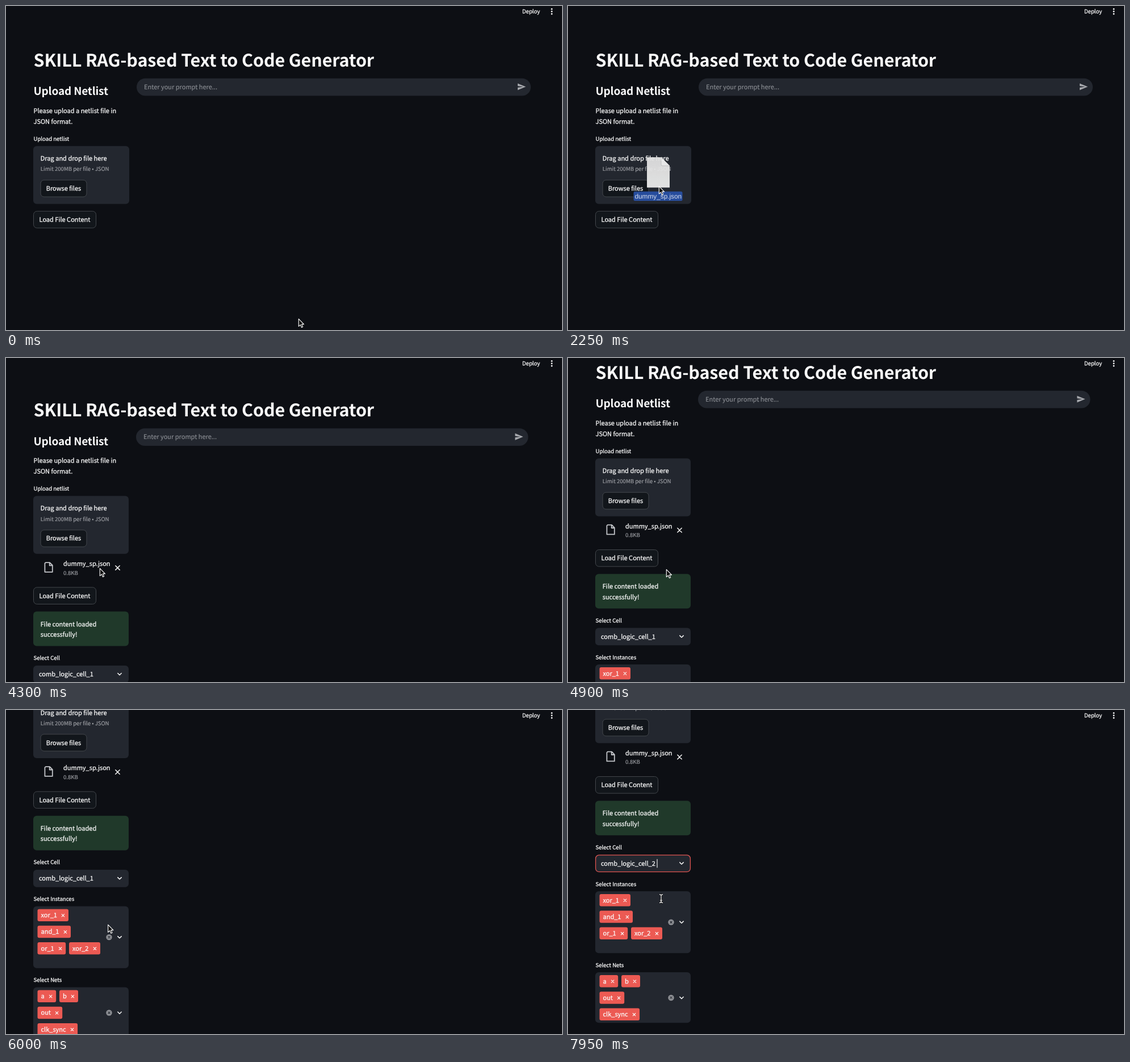
Write an HTML page that moves like this. It is 979 px wide and 572 px high and loops after 8000 ms.

```html
<!DOCTYPE html>
<html lang="en">
<head>
<meta charset="utf-8">
<title>Text to Code Generator</title>
<style>
  html, body { margin: 0; width: 100%; height: 100%; overflow: hidden; background: #0d0f14; }
  svg { display: block; position: fixed; left: 0; top: 0; }
  text {
    font-family: "Noto Sans CJK JP", "Noto Sans CJK SC", "Noto Sans CJK KR", "Open Sans", sans-serif;
    font-size: 11px; fill: #fafafa; stroke: #fafafa; stroke-width: .28px;
    text-rendering: geometricPrecision; white-space: pre;
  }
  .small { font-size: 9.6px; }
  .muted { fill: #a0a2a7; stroke: #a0a2a7; stroke-width: .15px; }
  .hint { fill: #8b8e94; stroke: #8b8e94; stroke-width: .15px; }
  .h1 { font-size: 30.56px; font-weight: 700; letter-spacing: -.005em; stroke: none; }
  .h3 { font-size: 19px; font-weight: 600; letter-spacing: -.009em; stroke: none; }
  .mid { text-anchor: middle; }
  .panel { fill: #23272f; }
  .button { fill: #12161b; stroke: #43474c; }
  .tag { fill: #ec5a53; }
  .line { fill: none; stroke: #fafafa; stroke-width: 1.5; stroke-linecap: round; stroke-linejoin: round; }
  .hover .button { stroke: #ec5a53; }
  .hover text { fill: #ec5a53; stroke: #ec5a53; }
  .focus { fill: none; stroke: #dd524e; stroke-width: 1.3; }
  .file-name { font: 11.8px "Liberation Sans", Arial, sans-serif; fill: #d5dcec; stroke: none; }
  .pointer { fill: #111; stroke: #fff; stroke-width: 1.1; stroke-linejoin: round; }
</style>
</head>
<body>
<svg id="stage" width="979" height="572" viewBox="0 0 979 572">
  <defs>
    <linearGradient id="paper" x1="0" y1="0" x2="0" y2="1">
      <stop offset="0" stop-color="#e2e2e2"/><stop offset="1" stop-color="#f0f0f0"/>
    </linearGradient>
  </defs>
</svg>
<script>
const LOOP = 8000, STEP = 50;

// Markup helpers
const text = (x, y, s, cls = '') => `<text x="${x}" y="${y}" class="${cls}">${s}</text>`;
const box = (x, y, w, h, r, cls, id = '') =>
  `<rect ${id && `id="${id}"`} x="${x}" y="${y}" width="${w}" height="${h}" rx="${r}" class="${cls}"/>`;
const group = (id, body) => `<g id="${id}">${body}</g>`;
const cross = (x, y, r, extra = '') =>
  `<path class="line" ${extra} d="M${x - r} ${y - r}l${2 * r} ${2 * r}m0 ${-2 * r}l${-2 * r} ${2 * r}"/>`;
const chevron = y => `<path class="line" d="M196.8 ${y - 1.5}l3.2 3.2l3.2 -3.2"/>`;
const clear = (id, y) =>
  `<circle id="${id}" cx="181.5" cy="${y}" r="5.2" fill="#8f9196"/>` +
  cross(181.5, y, 1.7, 'style="stroke:#23272f;stroke-width:1.2"');
const button = (x, y, w, label) =>
  box(x + .5, y + .5, w - 1, 29.6, 6, 'button') + text(x + w / 2, y + 19.2, label, 'mid');
const tag = (x, y, w, label) =>
  box(x, y, w, 21.6, 3, 'tag') + text(x + 6, y + 14.7, label) +
  cross(x + w - 9.6, y + 11.2, 2.2, 'style="stroke-width:1.2"');

const multi = (id, label, top, height, mid, tags) =>
  text(48.5, top - 9.3, label, 'small') + box(48, top, 168, height, 6, 'panel') +
  tags.map(([row, x, w, name]) => tag(x, top + 4.9 + row * 29.3, w, name)).join('') +
  clear(id, mid) + chevron(mid);

const prompt =
  box(230, 127.8, 694, 30.8, 15.4, 'panel', 'promptBox') +
  group('promptText', text(243, 147, 'Enter your prompt here...', 'hint')) +
  group('send', '<path fill="#a6a8ad" d="M901 136.7L915.2 142.6L901 148.5V143.9L910.5 142.6L901 141.3Z"/>');

const upload =
  text(48.5, 157.2, 'Upload Netlist', 'h3') +
  text(48.5, 188.5, 'Please upload a netlist file in') +
  text(48.5, 207.5, 'JSON format.') +
  text(48.5, 238, 'Upload netlist', 'small') +
  box(48, 247.2, 169, 102.2, 6, 'panel', 'drop') +
  text(60.8, 273, 'Drag and drop file here') +
  text(60.8, 291.4, 'Limit 200MB per file • JSON', 'small muted') +
  button(60.5, 306.8, 82, 'Browse files');

const fileRow =
  '<path class="line" style="stroke:#c4c6ca;stroke-width:1.8" d="M69.8 364.7H77L81.8 369.6V381.4H68.4V366.1ZM76.7 364.9V370H81.6"/>' +
  text(101, 370.6, 'dummy_sp.json') + text(101, 386.2, '0.8KB', 'small muted') +
  group('remove', cross(197.5, 374, 3.7));

const result =
  '<rect x="48" y="451.2" width="168" height="61" rx="6" fill="#20392a"/>' +
  text(60.8, 477.3, 'File content loaded') + text(60.8, 495.5, 'successfully!') +
  text(48.5, 536.8, 'Select Cell', 'small') +
  box(48, 546.6, 168, 30.6, 6, 'panel') +
  '<text id="cell" x="58" y="565.7"></text>' + chevron(561.6) +
  multi('clearInst', 'Select Instances', 611, 109.3, 665.6,
    [[0, 55.5, 54.5, 'xor_1'], [1, 55.5, 58.5, 'and_1'], [2, 55.5, 49.7, 'or_1'], [2, 111, 55, 'xor_2']]) +
  multi('clearNets', 'Select Nets', 754, 89.3, 799,
    [[0, 55.5, 32.7, 'a'], [0, 94, 33, 'b'], [1, 55.5, 43.7, 'out'], [2, 55.5, 70.6, 'clk_sync']]) +
  group('focus', box(48.6, 547.2, 166.8, 29.4, 6, 'focus') +
    '<path id="caret" d="M157 554.2v15.4" stroke="#fafafa" stroke-width="1.1"/>') +
  group('menu', '<rect x="48.5" y="579.5" width="167" height="59" rx="5" fill="#0f1218" stroke="#2c2f37"/>' +
    '<rect id="choice" x="49" width="166" height="29" fill="#2a2c34"/>' +
    text(58, 598.6, 'comb_logic_cell_1') + text(58, 627.6, 'comb_logic_cell_2'));

const header = text(909, 13.4, 'Deploy', 'small') +
  [5.4, 9.7, 14].map(y => `<circle cx="961" cy="${y}" r="1.4" fill="#fafafa"/>`).join('');

// Pointer shapes, drawn around the hot spot at 0,0
const drag =
  '<g opacity=".93"><path fill="url(#paper)" d="M-21 -51H4L19 -36V2.5H-21Z"/>' +
  '<path fill="#f6f6f6" stroke="#b5b5b5" stroke-width=".6" d="M4 -51V-38Q4 -36 6 -36H19Z"/></g>' +
  '<rect x="-44.5" y="9.5" width="86" height="16.5" rx="2.5" fill="#2850a6" opacity=".93"/>' +
  text(-1.2, 21.6, 'dummy_sp.json', 'file-name mid');
const shapes = {
  arrow: '<path class="pointer" d="M.3 .4V13.6L3.4 10.8L5.5 15.4L7.6 14.4L5.6 9.9H9.5Z"/>',
  hand: '<path class="pointer" style="fill:#fff;stroke:#111;stroke-width:.8" d="M-1.6 1.2Q-.2 -.6 1 1.2L1.5 5Q3 4.2 3.7 5.5Q5.2 5 5.8 6.3Q7.6 6 7.6 8L7 11.5L5.8 14.5H-.5L-4.6 9.4Q-4.6 7.6 -2.6 8.4L-.9 9.6Z"/>',
  beam: ['#111;stroke-width:2.8', '#fff;stroke-width:1.2'].map(s =>
    `<path fill="none" style="stroke:${s}" d="M-3 -7.3Q0 -7.3 0 -5.3V5.3Q0 7.3 -3 7.3M3 -7.3Q0 -7.3 0 -5.3M0 5.3Q0 7.3 3 7.3M-2 3H2"/>`).join('')
};

document.getElementById('stage').insertAdjacentHTML('beforeend',
  group('page', text(48.5, 107, 'SKILL RAG-based Text to Code Generator', 'h1') + prompt + upload +
    group('file', fileRow) + group('load', button(48, 361.8, 111, 'Load File Content')) + group('result', result)) +
  group('header', header) +
  group('cursor', group('drag', drag) + Object.entries(shapes).map(([k, s]) => group(k, s)).join('')));

// Timelines: [ms, values...]
const scrollPath = [[4150, 0], [4300, 3.6], [4750, 36], [4850, 36], [4900, 70], [4950, 125], [5000, 164],
  [5200, 168.6], [5500, 168.6], [5700, 205], [5950, 258], [6150, 284], [6300, 291]];
const cursorPath = [[50, 515, 552], [300, 300, 430], [500, 50, 300], [1450, -60, 145], [1500, -22, 168],
  [1650, 45, 208], [1700, 78, 239], [1900, 125, 285], [2200, 160, 318], [2350, 160, 318], [2700, 140, 385],
  [3050, 113, 440], [3250, 113, 440], [3450, 113, 428], [4050, 114, 424], [4300, 165, 371], [4700, 173, 373],
  [5300, 173, 373], [5350, 175, 375], [5500, 175, 375], [6300, 182, 381], [6500, 182, 381], [7050, 160, 269],
  [7300, 160, 269], [7800, 164, 333]];
const cursorKind = [[0, 'arrow'], [3400, 'hand'], [4100, 'arrow'], [6150, 'hand'], [6900, 'beam'],
  [7350, 'hand'], [7900, 'beam']];

function at(path, t) {
  const n = path.findIndex(p => p[0] > t);
  if (n < 0) return path[path.length - 1].slice(1);
  if (n === 0) return path[0].slice(1);
  const a = path[n - 1], b = path[n], k = (t - a[0]) / (b[0] - a[0]);
  return a.slice(1).map((v, i) => v + (b[i + 1] - v) * k);
}

const $ = id => document.getElementById(id);
const show = (id, on) => { $(id).style.display = on ? '' : 'none'; };
const move = (id, x, y) => $(id).setAttribute('transform', `translate(${x} ${y})`);

function render(t) {
  const within = (a, b) => t >= a && t < b;
  const [scroll] = at(scrollPath, t);
  const [x, y] = at(cursorPath, t);
  const kind = cursorKind.filter(k => k[0] <= t).pop()[1];
  const uploaded = t >= 2450, loaded = t >= 3650;

  move('page', 0, -scroll);
  show('file', uploaded);
  show('result', loaded);
  move('load', 0, uploaded ? 46.2 : 0);
  $('load').setAttribute('class', within(3400, 4050) ? 'hover' : '');

  // The scrollbar narrows the columns once the page overflows
  $('drop').setAttribute('width', loaded ? 168 : 169);
  $('promptBox').setAttribute('x', loaded ? 229 : 230);
  $('promptBox').setAttribute('width', loaded ? 690.5 : 694);
  move('promptText', loaded ? -1 : 0, 0);
  move('send', loaded ? -4.6 : 0, 0);
  move('remove', loaded ? -1 : 0, 0);

  $('clearInst').setAttribute('fill', within(6350, 6650) ? '#fafafa' : '#8f9196');
  $('cell').textContent = 'comb_logic_cell_' + (t >= 7900 ? 2 : 1);
  show('focus', t >= 7250);
  show('menu', within(7250, 7900));
  $('choice').setAttribute('y', y > 318 ? 609 : 580);

  show('cursor', !within(550, 1500));
  show('drag', within(1450, 2300));
  Object.keys(shapes).forEach(k => show(k, k === kind));
  move('cursor', x, y);
}

const start = performance.now();
function tick() {
  const t = (performance.now() - start) % LOOP;
  render(Math.floor(t / STEP) * STEP);
  requestAnimationFrame(tick);
}
render(0);
requestAnimationFrame(tick);
</script>
</body>
</html>
```
